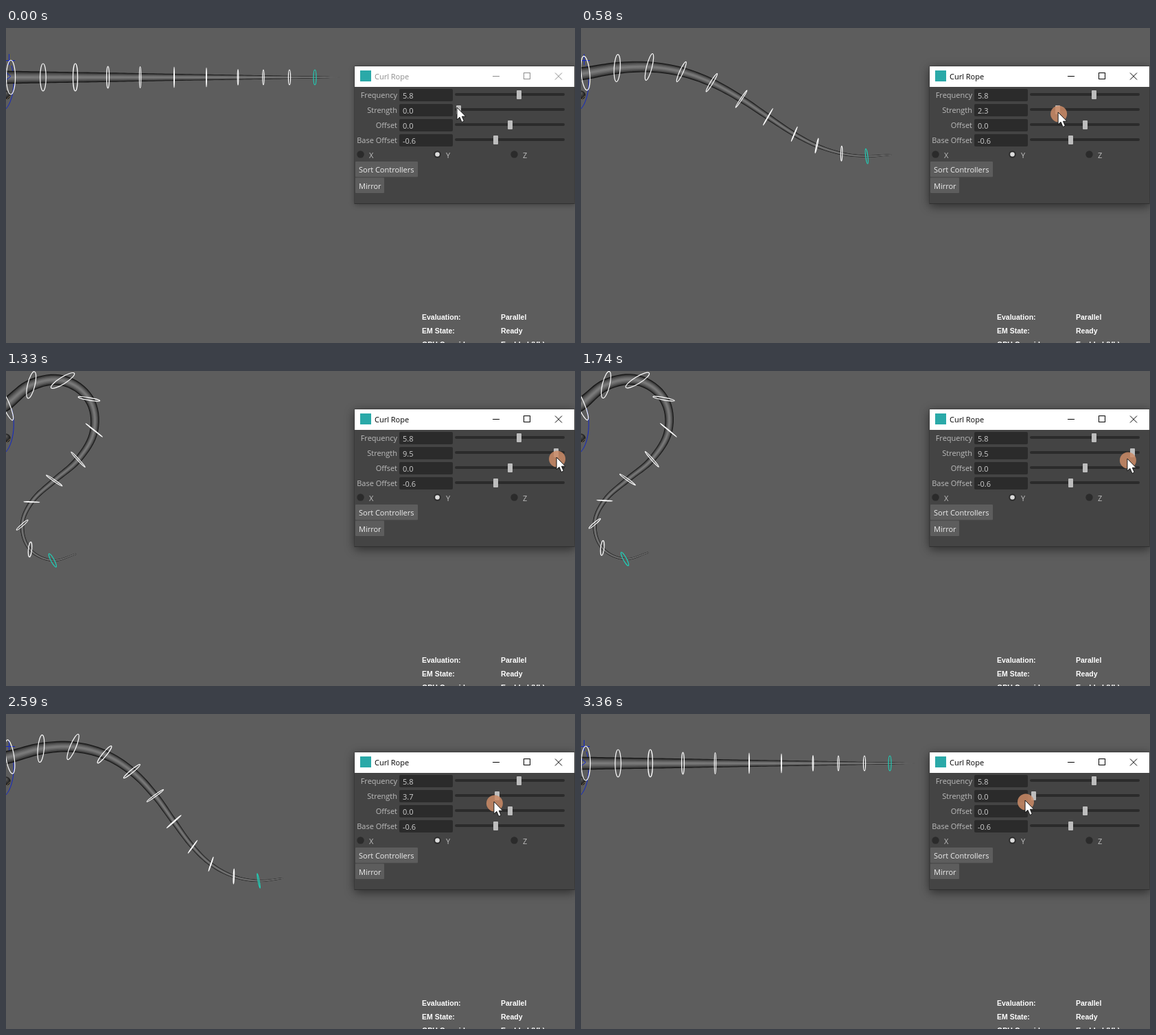
Write an HTML page with a canvas that moves like this. It is 829 px wide and 460 px high and loops after 3430 ms.

```html
<!DOCTYPE html>
<html lang="en">
<head>
<meta charset="utf-8">
<title>Tail rig</title>
<style>
  html, body { margin: 0; width: 100%; height: 100%; overflow: hidden; background: #5d5d5d; }
  canvas { display: block; }
</style>
</head>
<body>
<canvas id="stage" width="829" height="460"></canvas>
<script>
const ctx = document.getElementById('stage').getContext('2d');
const LOOP = 3430, PRESS_AT = 70, RAD = Math.PI / 180;
const UI_FONT = '11px "Open Sans", "Noto Sans", sans-serif';
const HUD_FONT = 'bold 10.5px "Liberation Sans", Arial, sans-serif';

// Pairs of [ms, value]
const STRENGTH = [[0, 0], [110, 0], [580, 2.3], [1110, 8], [1330, 9.45], [1500, 9.97], [1650, 9.85],
  [1740, 9.54], [2210, 6.7], [2590, 3.7], [2710, 3.05], [3270, 0], [3430, 0]];
const MOUSE_X = [[0, 657], [70, 657], [580, 695], [1110, 780], [1330, 802], [1500, 811], [1650, 803],
  [1740, 796], [2210, 752], [2590, 711], [2710, 698], [3240, 652], [3360, 647], [3430, 647]];
const MOUSE_Y = [[0, 116], [70, 116], [580, 123], [1330, 126], [1740, 128], [2590, 128], [3360, 126], [3430, 126]];

const BONES = [47, 47, 47, 47.5, 47, 49.5, 47, 46, 37, 38, 37, 36];
const RING_RADII = [25, 20, 20, 16, 15.5, 15, 14, 11.5, 11, 11, 11];
const TAIL_LAYERS = [[1, '#141414'], [0.86, '#343434'], [0.72, '#484848'], [0.57, '#575757'],
  [0.42, '#656565'], [0.25, '#727272'], [0.1, '#7a7a7a']];

// Monotone cubic interpolation through the keys
function track(keys, t) {
  const slope = i => (keys[i + 1][1] - keys[i][1]) / (keys[i + 1][0] - keys[i][0]);
  const tangent = i => {
    if (i === 0 || i === keys.length - 1) return 0;
    const a = slope(i - 1), b = slope(i);
    return a * b <= 0 ? 0 : 2 * a * b / (a + b);
  };
  let i = 0;
  while (i < keys.length - 2 && t >= keys[i + 1][0]) i++;
  const span = keys[i + 1][0] - keys[i][0];
  return hermite(keys[i][1], keys[i + 1][1], tangent(i) * span, tangent(i + 1) * span, (t - keys[i][0]) / span);
}

function hermite(a, b, ta, tb, u) {
  const u2 = u * u, u3 = u2 * u;
  return a * (2 * u3 - 3 * u2 + 1) + b * (3 * u2 - 2 * u3) + ta * (u3 - 2 * u2 + u) + tb * (u3 - u2);
}

function rect(x, y, w, h, fill, radius = 0) {
  ctx.fillStyle = fill;
  ctx.beginPath();
  ctx.roundRect(x, y, w, h, radius);
  ctx.fill();
}

function disc(x, y, r, fill) {
  ctx.fillStyle = fill;
  ctx.beginPath();
  ctx.arc(x, y, r, 0, 7);
  ctx.fill();
}

function line(points, color, width = 1) {
  ctx.strokeStyle = color;
  ctx.lineWidth = width;
  ctx.beginPath();
  points.forEach(([x, y]) => ctx.lineTo(x, y));
  ctx.stroke();
}

function text(str, x, y, fill, font = UI_FONT, align = 'left') {
  ctx.font = font;
  ctx.fillStyle = fill;
  ctx.textAlign = align;
  ctx.fillText(str, x, y);
}

// Every joint bends by a sine of its index, scaled by the strength
function poseTail(strength) {
  const angles = [-3.2 * strength, -3.97 * strength];
  for (let k = 2; k <= BONES.length; k++) {
    angles.push(angles[k - 1] + 4.895 * strength * Math.cos(0.5 * (k - 3.76)));
  }
  const joints = [{ x: -40, y: 72 }];
  const shrink = 1 - 0.0015 * strength;
  BONES.forEach((len, k) => {
    const p = joints[k], a = angles[k] * RAD;
    joints.push({ x: p.x + len * shrink * Math.cos(a), y: p.y + len * shrink * Math.sin(a) });
  });
  return { angles, joints };
}

function sampleTail({ angles, joints }) {
  const steps = 8, samples = [];
  const last = BONES.length - 1;
  const heading = k => (angles[Math.max(k - 1, 0)] + angles[Math.min(k, last)]) / 2 * RAD;
  let reached = 0;
  BONES.forEach((len, k) => {
    const p = joints[k], q = joints[k + 1], a = heading(k), b = heading(k + 1);
    for (let i = k ? 1 : 0; i <= steps; i++) {
      const u = i / steps;
      samples.push({
        x: hermite(p.x, q.x, len * Math.cos(a), len * Math.cos(b), u),
        y: hermite(p.y, q.y, len * Math.sin(a), len * Math.sin(b), u),
        angle: a + (b - a) * u,
        half: 10.2 - 9.3 * (reached + len * u) / 524
      });
    }
    reached += len;
  });
  return samples;
}

function drawTail(pose) {
  const samples = sampleTail(pose);
  for (const [scale, color] of TAIL_LAYERS) {
    const edge = side => s => [s.x - Math.sin(s.angle) * s.half * scale * side,
      s.y + Math.cos(s.angle) * s.half * scale * side];
    const outline = samples.map(edge(1)).concat(samples.map(edge(-1)).reverse());
    ctx.fillStyle = color;
    ctx.beginPath();
    outline.forEach(([x, y]) => ctx.lineTo(x, y));
    ctx.fill();
  }
}

// Rings open up with their distance from the centre of the view
function drawRings({ angles, joints }) {
  RING_RADII.forEach((radius, i) => {
    const { x, y } = joints[i + 1];
    const a = (angles[i + 1] + angles[i + 2]) / 2 * RAD;
    const open = Math.abs(Math.cos(a) * (x - 270) + Math.sin(a) * (y - 190)) / 1000;
    ctx.strokeStyle = i === RING_RADII.length - 1 ? '#1fd0b8' : '#ffffff';
    ctx.lineWidth = 1.2;
    ctx.beginPath();
    ctx.ellipse(x, y, Math.max(0.4, radius * open), radius, a, 0, 2 * Math.PI);
    ctx.stroke();
  });
}

function drawBody() {
  const blue = '#1026c8';
  const shade = ctx.createRadialGradient(0, 95, 1, 0, 98, 7);
  shade.addColorStop(0, '#555');
  shade.addColorStop(1, '#0c0c0c');
  disc(0, 98, 6.5, shade);
  line([[0, 105], [6, 99]], '#7d6b50');
  line([[0, 47.5], [13, 47.5]], blue);
  line([[4.5, 38], [4.5, 54]], blue);
  ctx.beginPath();
  ctx.moveTo(0, 118);
  ctx.bezierCurveTo(10, 107, 15, 78, 8, 55);
  ctx.stroke();
}

function drawHud() {
  [['Evaluation:', 'Parallel'], ['EM State:', 'Ready'], ['GPU Override:', 'Enabled (VL)']].forEach(([name, value], i) => {
    text(name, 606, 426 + 20 * i, '#fff', HUD_FONT);
    text(value, 721, 426 + 20 * i, '#fff', HUD_FONT);
  });
}

function drawFrame(active) {
  ctx.save();
  ctx.shadowColor = active ? 'rgba(0,0,0,.55)' : 'rgba(0,0,0,.35)';
  ctx.shadowBlur = active ? 14 : 8;
  ctx.shadowOffsetY = active ? 3 : 1;
  rect(507.5, 55.5, 321, 201.5, '#303030');
  ctx.restore();
  rect(508, 56, 320, 30, '#fff');
  rect(508, 86, 320, 170, '#444');
  rect(516, 62, 16, 16, '#2aa9a8');
  const ink = active ? '#000' : '#8c8c8c';
  text('Curl Rope', 537, 75, ink);
  line([[709, 70.5], [719, 70.5]], ink);
  ctx.strokeRect(754.5, 65.5, 9, 9);
  line([[800, 65.5], [810, 75.5]], ink);
  line([[800, 75.5], [810, 65.5]], ink);
}

function drawControls(strength) {
  const rows = [['Frequency', 5.8, 747], ['Strength', strength, 659.5 + 15.05 * strength],
    ['Offset', 0, 734], ['Base Offset', -0.6, 713]];
  rows.forEach(([label, value, handle], i) => {
    const y = 97 + 22 * i;
    text(label, 570, y + 5, '#bdbdbd', UI_FONT, 'right');
    rect(573, y - 8, 78, 18, '#2b2b2b', 2);
    text(value.toFixed(1), 578, y + 6, '#d0d0d0');
    rect(654, y - 2, 160, 4, '#2b2b2b', 2);
    rect(Math.round(handle - 3.5), y - 6, 7, 13, '#bdbdbd', 1);
  });
  ['X', 'Y', 'Z'].forEach((axis, i) => {
    const x = 516.5 + 112 * i;
    disc(x, 184.5, 5.2, '#2b2b2b');
    if (axis === 'Y') disc(x, 184.5, 3.3, '#dcdcdc');
    text(axis, x + 12.5, 190, '#bdbdbd');
  });
  [['Sort Controllers', 195, 91], ['Mirror', 218.5, 42]].forEach(([label, y, w]) => {
    rect(509, y, w, 22.5, '#5d5d5d', 1);
    text(label, 514, y + 16, '#eee');
  });
}

function drawCursor(x, y, pressed) {
  if (pressed) disc(x + 1, y + 2.5, 12, 'rgba(203,139,102,.85)');
  const arrow = [[0, 0], [0, 18], [4, 14.3], [7, 21.5], [10.3, 20], [7.4, 13.2], [12.8, 13.2]];
  ctx.beginPath();
  arrow.forEach(([dx, dy]) => ctx.lineTo(x + dx, y + dy));
  ctx.closePath();
  ctx.fillStyle = '#fff';
  ctx.fill();
  ctx.strokeStyle = '#151515';
  ctx.lineWidth = 1;
  ctx.stroke();
}

function draw(t) {
  const strength = Math.max(0, track(STRENGTH, t));
  const pressed = t >= PRESS_AT;
  const pose = poseTail(strength);
  rect(0, 0, 829, 460, '#5d5d5d');
  drawBody();
  drawTail(pose);
  line([[0, 65], [7, 70.5], [0, 76]], strength < 0.3 ? '#1026c8' : 'transparent');
  drawRings(pose);
  drawHud();
  drawFrame(pressed);
  drawControls(strength);
  drawCursor(track(MOUSE_X, t), track(MOUSE_Y, t), pressed);
}

const start = performance.now();
function tick() {
  draw((performance.now() - start) % LOOP);
  requestAnimationFrame(tick);
}
tick();
</script>
</body>
</html>
```
